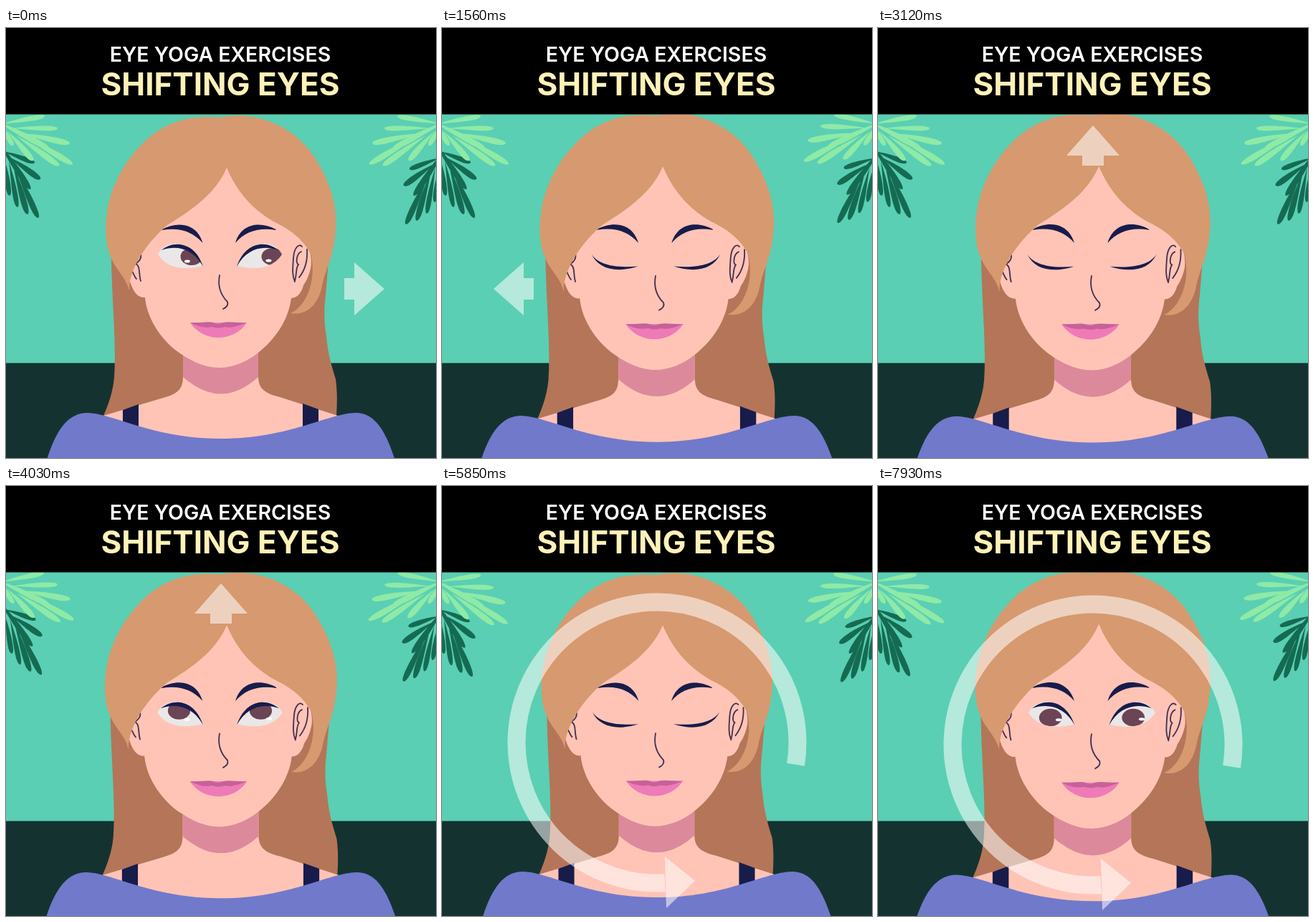
These frames come from a looping animation (600x600 px, 8000 ms). An HTML page:

```html
<!DOCTYPE html>
<html lang="en">
<head>
<meta charset="utf-8">
<title>Shifting eyes</title>
<style>
  html, body { margin: 0; width: 100%; height: 100%; overflow: hidden; background: #000; }
  svg { display: block; width: 100%; height: 100%; }
  text { font-family: Inter, "Open Sans", sans-serif; font-weight: 600; text-anchor: middle; }
  .skin { fill: #ffc4b6; }
  .hair { fill: #d7996f; }
  .back { fill: #b57558; }
  .navy { fill: #171c4b; }
  .line { fill: none; stroke: #43304f; stroke-width: 1.800; stroke-linecap: round; }
  .light { fill: #8eeaa6; }
  .dark { fill: #156b52; }
  .hint { fill: #fff; opacity: .55; }
</style>
</head>
<body>
<svg viewBox="0 0 600 600">
  <defs>
    <path id="white" d="M212 316C222 294 262 294 274 332C254 337 226 338 212 316Z"/>
    <path id="lid" d="M217 310C233 296 263 297 275 333C262 309 240 302 217 310Z"/>
    <path id="shut" d="M210 315C218 328 238 335 274 332C246 341 220 337 210 315Z"/>
    <path id="brow" d="M218 281C238 270 266 271 274.500 300C261 284 242 278 218 282Z"/>
    <clipPath id="clipL"><use href="#white"/></clipPath>
    <clipPath id="clipR"><use href="#white" transform="translate(597) scale(-1 1)"/></clipPath>
  </defs>

  <rect width="600" height="468" fill="#5acfb3"/>
  <rect y="467.500" width="600" height="133" fill="#143330"/>

  <g id="leafL"></g>
  <g transform="translate(600 0) scale(-1 1)"><g id="leafR"></g></g>

  <g id="woman">
    <path class="back" d="M147 290V325C149 400 154 440 151 488Q149 512 136 541L300 570L461 541Q463 510 460 490C454 470 449 455 447 430C443 405 444 390 446 372L452 300Z"/>
    <path class="skin" d="M247 430V486C247 506 238 511 216 517L136 541L160 600H440L463 541L382 515C362 510 352 504 352 486V430Z"/>
    <path fill="#dc8a9b" d="M247 440V487Q300 534 352 487V440Z"/>
    <path class="navy" d="M163 533L185 525V575H163ZM414 524L436 532V575H414Z"/>
    <path fill="#7179cb" d="M52 620C66 567 83 537 114 537C150 538 205 573 300 573C395 573 448 538 488 537C517 537 533 567 548 620Z"/>

    <path class="skin" d="M168 335C173 355 178 377 194 376C197 408 220 440 246 456C264 468 282 474 298 474C316 474 336 466 352 453C377 433 394 407 398 377C414 377 417 357 422 346C428 330 428 318 424 305L400 250L308 180L210 250Z"/>
    <path class="line" d="M187 311C191 322 185 326 181 329C188 332 185 344 188 353M174 337C178 340 178 346 182 350"/>
    <path class="line" d="M403 354C399 345 400 336 401 321C402 306 409 300 413 305M412 312C405 315 404 328 408 330C404 335 406 343 403 353M420 309C421 325 417 338 409 348"/>

    <use href="#brow" class="navy"/>
    <use href="#brow" class="navy" transform="translate(594.500) scale(-1 1)"/>

    <g id="open">
      <use href="#white" fill="#e9e7e7"/>
      <use href="#white" fill="#e9e7e7" transform="translate(597) scale(-1 1)"/>
      <g clip-path="url(#clipL)">
        <ellipse class="iris" cx="242" cy="318" rx="15.500" ry="12" fill="#6b4455"/>
        <ellipse cx="253" cy="325.500" rx="4" ry="2" fill="#fff"/>
      </g>
      <g clip-path="url(#clipR)">
        <ellipse class="iris" cx="355" cy="318" rx="15.500" ry="12" fill="#6b4455"/>
        <ellipse cx="366.500" cy="324.500" rx="4" ry="2" fill="#fff"/>
      </g>
      <use href="#lid" class="navy"/>
      <use href="#lid" class="navy" transform="translate(597) scale(-1 1)"/>
    </g>
    <g id="closed">
      <use href="#shut" class="navy"/>
      <use href="#shut" class="navy" transform="translate(597) scale(-1 1)"/>
    </g>

    <path class="line" d="M298 345C295 361 300 373 309 382Q311 388 303 392"/>
    <path fill="#ee7bb7" d="M257 411C275 439 318 439 336 411Z"/>
    <path fill="#c8609a" d="M257 411C270 412 283 409 289 411Q296 415 303 411C312 409 325 412 336 411C322 417 312 419 305 417Q297 420 288 417C278 419 268 417 257 411Z"/>

    <path class="back" d="M422 305C428 325 428 340 415 359C412 370 406 377 398 377L397 399L432 388L446 330Z"/>
    <path class="hair" d="M172 367C167 343 146 335 140.500 300C133 245 158 196 184 168C213 135 250 120 300 125C318 120 342 122 361 128C401 141 425 167 439 195C456 225 464 258 459 292C455 325 446 335 441 360C436 385 420 402 397 398C420 388 434 350 425 315C413 292 392 279 375 271C343 253 322 228 308 195C294 228 266 250 225 275C198 298 171 335 172 367Z"/>
  </g>

  <path id="arrow" class="hint" d="M172-15h14v-22l42 37l-42 37v-22h-14Z"/>
  <g id="ring" class="hint">
    <path fill="none" stroke="#fff" stroke-width="25" d="M493.600 30.700A196 196 0 1 0 311 195.700"/>
    <path d="M311 159L353 193L313 231Z"/>
  </g>

  <rect width="600" height="120.500"/>
  <text x="299" y="47" font-size="28.500" fill="#fff">EYE YOGA EXERCISES</text>
  <text x="299" y="93.500" font-size="44" font-weight="700" style="font-weight:700" fill="#fff2b8">SHIFTING EYES</text>
</svg>
<script>
  const LOOP = 8000, FRAME = 130;
  const STEP = 1430, FIRST = 1300, SHUT = 520;
  const TURNS = [0, 180, -90, 90];
  const GAZES = [[17, 1], [-17, 1], [0, -4.5], [0, 4.5]];
  const $ = id => document.getElementById(id);
  const set = (el, name, value) => el.setAttribute(name, value);
  const show = (el, on) => { el.style.display = on ? "" : "none"; };
  const irises = document.querySelectorAll(".iris");

  // A slim finger of a leaf: base, tip, half width.
  function finger(x, y, tx, ty, w) {
    const len = Math.hypot(tx - x, ty - y);
    const nx = -(ty - y) / len * w, ny = (tx - x) / len * w;
    const at = (k, s) => `${x + (tx - x) * k + nx * s} ${y + (ty - y) * k + ny * s}`;
    return `M${x} ${y}C${at(.4, .3)} ${at(.95, 1.4)} ${tx} ${ty}C${at(1, -.9)} ${at(.6, -1)} ${x} ${y}Z`;
  }
  const leaf = (kind, list) =>
    `<path class="${kind}" d="${list.map(f => finger(...f)).join("")}"/>`;

  const dark = leaf("dark", [
    [-12, 158, 34, 225, 6], [4, 180, 48, 211, 6], [14, 198, 45, 265, 6],
    [10, 192, 30, 260, 6], [4, 186, 16, 250, 5], [-3, 180, 5, 234, 5],
    [-4, 172, 40, 188, 5]
  ]);
  const light = leaf("light", [
    [-14, 130, 60, 168, 6], [24, 150, 93, 190, 6], [20, 147, 89, 161, 6],
    [8, 140, 72, 140, 5], [-6, 134, 54, 123, 5], [14, 150, 74, 192, 6],
    [2, 144, 38, 185, 6], [-10, 132, 10, 164, 5]
  ]);
  $("leafL").innerHTML = dark + light;
  $("leafR").innerHTML = `<g transform="translate(-3 9)">${dark}</g>${light}`;

  const ease = k => {
    k = Math.min(1, Math.max(0, k));
    return k * k * (3 - 2 * k);
  };

  function gazeAt(t, part) {
    if (part < 4) return GAZES[part];
    const a = Math.PI * (.5 + (t - 6890) / 1040);
    return [17 * Math.cos(a), -4.5 * Math.sin(a)];
  }

  function draw(t) {
    const breath = 1 + .0115 * (1 - Math.cos(2 * Math.PI * (t + 170) / 5300));
    set($("woman"), "transform", `translate(300 295) scale(${breath}) translate(-300 -295)`);

    const sway = 2 * Math.PI * t / 3120;
    set($("leafL"), "transform", `rotate(${-2 * Math.sin(sway)} 0 140)`);
    set($("leafR"), "transform", `rotate(${-1.2 * (1 - Math.cos(sway))} 0 140)`);

    const since = t - FIRST;
    const part = since < 0 ? 0 : Math.min(4, 1 + Math.floor(since / STEP));
    const shut = part > 0 && since - (part - 1) * STEP < SHUT;
    show($("open"), !shut);
    show($("closed"), shut);

    const [x, y] = gazeAt(t, part);
    irises.forEach(iris => set(iris, "transform", `translate(${x} ${y})`));

    show($("arrow"), part < 4);
    show($("ring"), part === 4);
    set($("arrow"), "transform", `translate(300 364) rotate(${TURNS[part] || 0})`);
    set($("ring"), "transform", `translate(0 ${358 + 3 * ease((t - 5850) / 520)})`);
  }

  const start = performance.now();
  function tick() {
    const t = (performance.now() - start) % LOOP;
    draw(Math.floor(t / FRAME) * FRAME);
    requestAnimationFrame(tick);
  }
  tick();
</script>
</body>
</html>
```
